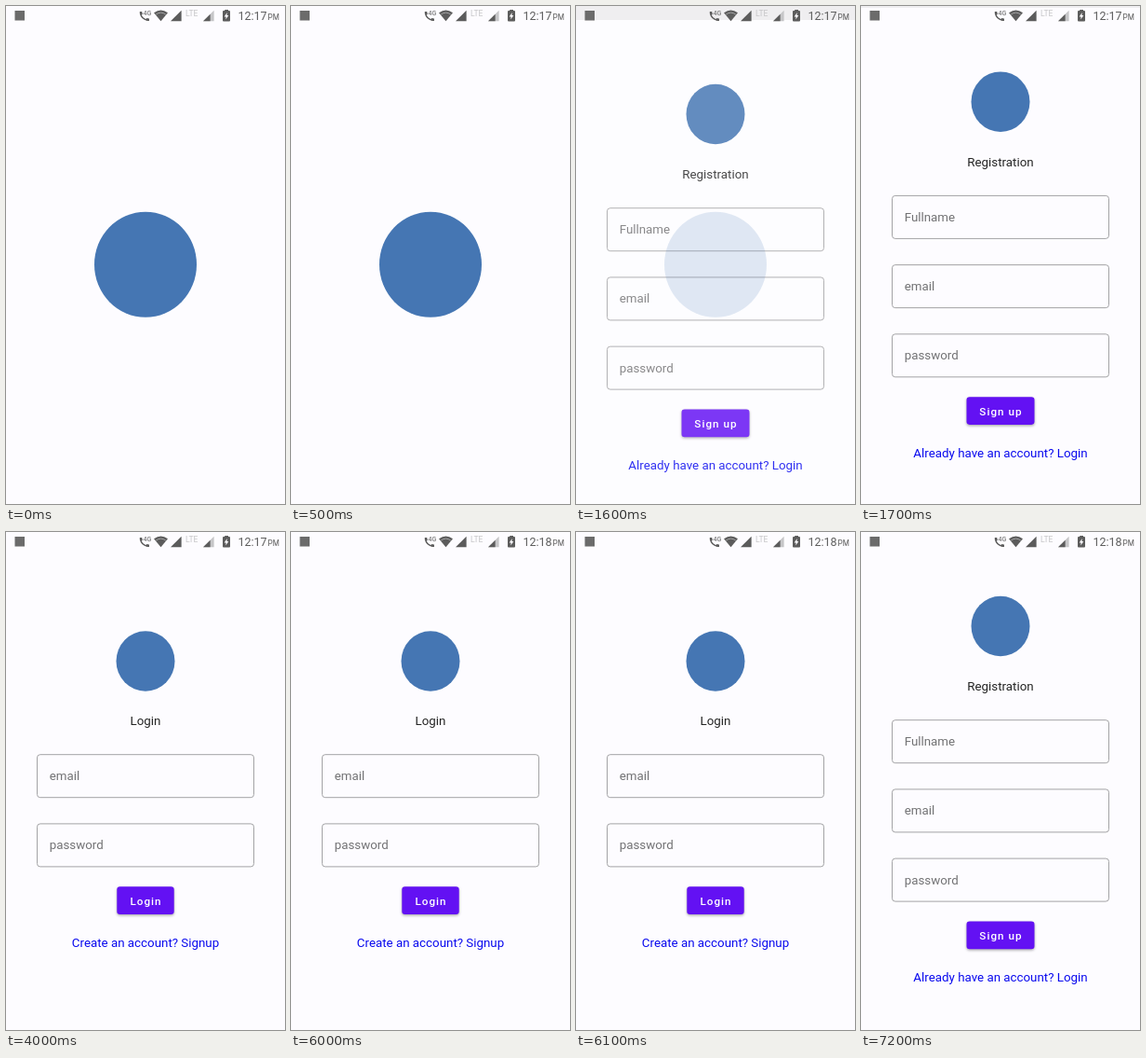
These frames come from a looping animation (300 by 534 pixels, 8 s). An HTML page with a canvas:

```html
<!DOCTYPE html>
<html lang="en">
<head>
<meta charset="utf-8">
<title>Sign up flow</title>
<style>
html, body { margin: 0; width: 100%; height: 100%; overflow: hidden; background: #fdfcff; }
canvas { display: block; width: 300px; height: 534px; }
</style>
</head>
<body>
<canvas id="stage"></canvas>
<script>
const W = 300, H = 534, LOOP = 8000;
const PAPER = '#fdfcff', BLUE = '#4576b3', GREY = '#5c5c5c', PALE = '#c6c6c8';
const FONT = 'Roboto, sans-serif';
const canvas = document.getElementById('stage');
const ctx = canvas.getContext('2d');
const ratio = window.devicePixelRatio || 1;
canvas.width = W * ratio;
canvas.height = H * ratio;

const forms = {
  signup: {
    title: 'Registration', logo: 101, titleY: 169.8, fields: ['Fullname', 'email', 'password'],
    top: 201.7, button: 'Sign up', half: 36.5, buttonY: 417.5,
    link: 'Already have an account? Login', linkY: 482.3
  },
  login: {
    title: 'Login', logo: 138.5, titleY: 207, fields: ['email', 'password'],
    top: 238.7, button: 'Login', half: 30.7, buttonY: 380.3,
    link: 'Create an account? Signup', linkY: 445.2
  }
};

function text(str, x, y, size, color, align = 'left', weight = 400, spacing = 0) {
  ctx.font = `${weight} ${size}px ${FONT}`;
  ctx.textAlign = align;
  ctx.letterSpacing = spacing + 'px';
  ctx.fillStyle = color;
  ctx.fillText(str, x, y);
}

function poly(color, ...pts) {
  ctx.fillStyle = color;
  ctx.beginPath();
  for (let i = 0; i < pts.length; i += 2) ctx.lineTo(pts[i], pts[i + 1]);
  ctx.closePath();
  ctx.fill();
}

function disc(y, rx, ry) {
  ctx.fillStyle = BLUE;
  ctx.beginPath();
  ctx.ellipse(150, y, rx, ry, 0, 0, 7);
  ctx.fill();
}

function roundBox(x, y, w, h, r) {
  ctx.beginPath();
  ctx.roundRect(x, y, w, h, r);
}

function paper() {
  ctx.fillStyle = PAPER;
  ctx.fillRect(0, 0, W, H);
}

function splash() {
  paper();
  disc(277.2, 55, 56.5);
}

function drawForm(f) {
  paper();
  disc(f.logo, 31.5, 32.3);
  text(f.title, 150, f.titleY, 13.33, '#252525', 'center');
  f.fields.forEach((label, i) => {
    const y = f.top + i * 74.2;
    ctx.strokeStyle = '#a3a3a5';
    ctx.lineWidth = 1;
    roundBox(33.5, y, 233, 46, 3.3);
    ctx.stroke();
    text(label, 46.7, y + 27.4, 13.33, '#727274');
  });
  ctx.save();
  ctx.shadowColor = 'rgba(0,0,0,.35)';
  ctx.shadowBlur = 3 * ratio;
  ctx.shadowOffsetY = 1.3 * ratio;
  ctx.fillStyle = '#6311f3';
  roundBox(150 - f.half, f.buttonY, f.half * 2, 29.7, 3.3);
  ctx.fill();
  ctx.restore();
  text(f.button, 150.5, f.buttonY + 19.4, 11.67, '#fff', 'center', 500, 1.04);
  text(f.link, 150, f.linkY, 13.33, '#0a0aee', 'center');
}

function statusBar(clock) {
  ctx.fillStyle = '#6b6b6b';
  ctx.fillRect(9.5, 5, 10.5, 10.5);

  // handset
  ctx.strokeStyle = GREY;
  ctx.lineWidth = 1.5;
  ctx.beginPath();
  ctx.moveTo(144.6, 7.5);
  ctx.quadraticCurveTo(145.4, 14.4, 152.8, 15.2);
  ctx.stroke();
  poly(GREY, 143.8, 6, 146.2, 6, 146.9, 8.8, 145.1, 10.1, 143.9, 8.4);
  poly(GREY, 150, 14.7, 151.2, 13, 154, 13.6, 154, 16, 151.5, 15.8);
  text('4G', 147.6, 10.3, 7, GREY);

  // wifi
  ctx.fillStyle = GREY;
  ctx.beginPath();
  ctx.moveTo(159, 7.2);
  ctx.quadraticCurveTo(166.5, 1.8, 174, 7.2);
  ctx.lineTo(166.5, 16.3);
  ctx.fill();
  ctx.strokeStyle = '#b5b5b7';
  ctx.lineWidth = 0.8;
  ctx.beginPath();
  ctx.moveTo(161.3, 9);
  ctx.quadraticCurveTo(166.5, 5.3, 171.7, 9);
  ctx.stroke();

  // signal strength
  poly(GREY, 177, 16.3, 188.6, 16.3, 188.6, 4.7);
  text('LTE', 193, 11, 8.6, PALE);
  poly(PALE, 212, 16.3, 223.6, 16.3, 223.6, 4.7);
  poly(GREY, 212, 16.3, 219.6, 16.3, 219.6, 8.7);

  // battery
  ctx.fillStyle = GREY;
  ctx.fillRect(235.2, 4, 3.8, 2);
  roundBox(233, 5.1, 8, 11.4, 1);
  ctx.fill();
  poly(PAPER, 237.7, 7, 234.7, 11.6, 236.6, 11.6, 236.3, 14.6, 239.3, 10, 237.5, 10);

  text(clock, 249.5, 14.8, 12.5, GREY);
  text('PM', 281.5, 14.8, 8.2, GREY);
}

// The form slides up while it fades in over the splash.
function enter(t) {
  const age = Math.floor((t - 1600) / 100) * 100 + 66;
  const shift = 42.7 * (1 - Math.min(1, age / 350)) ** 5;
  const veil = (1 - Math.min(1, age / 200)) ** 4 * 0.8;
  ctx.save();
  ctx.translate(0, shift);
  drawForm(forms.signup);
  ctx.restore();
  ctx.save();
  ctx.globalAlpha = veil;
  splash();
  ctx.restore();
  ctx.fillStyle = '#efeef0';
  ctx.fillRect(0, 0, W, shift);
}

function draw(t) {
  ctx.setTransform(ratio, 0, 0, ratio, 0, 0);
  if (t < 1600) splash();
  else if (t < 1900) enter(t);
  else drawForm(t >= 4000 && t < 7200 ? forms.login : forms.signup);
  statusBar(t < 6000 ? '12:17' : '12:18');
}

const start = performance.now();
function tick() {
  draw((performance.now() - start) % LOOP);
  requestAnimationFrame(tick);
}
tick();
</script>
</body>
</html>
```
